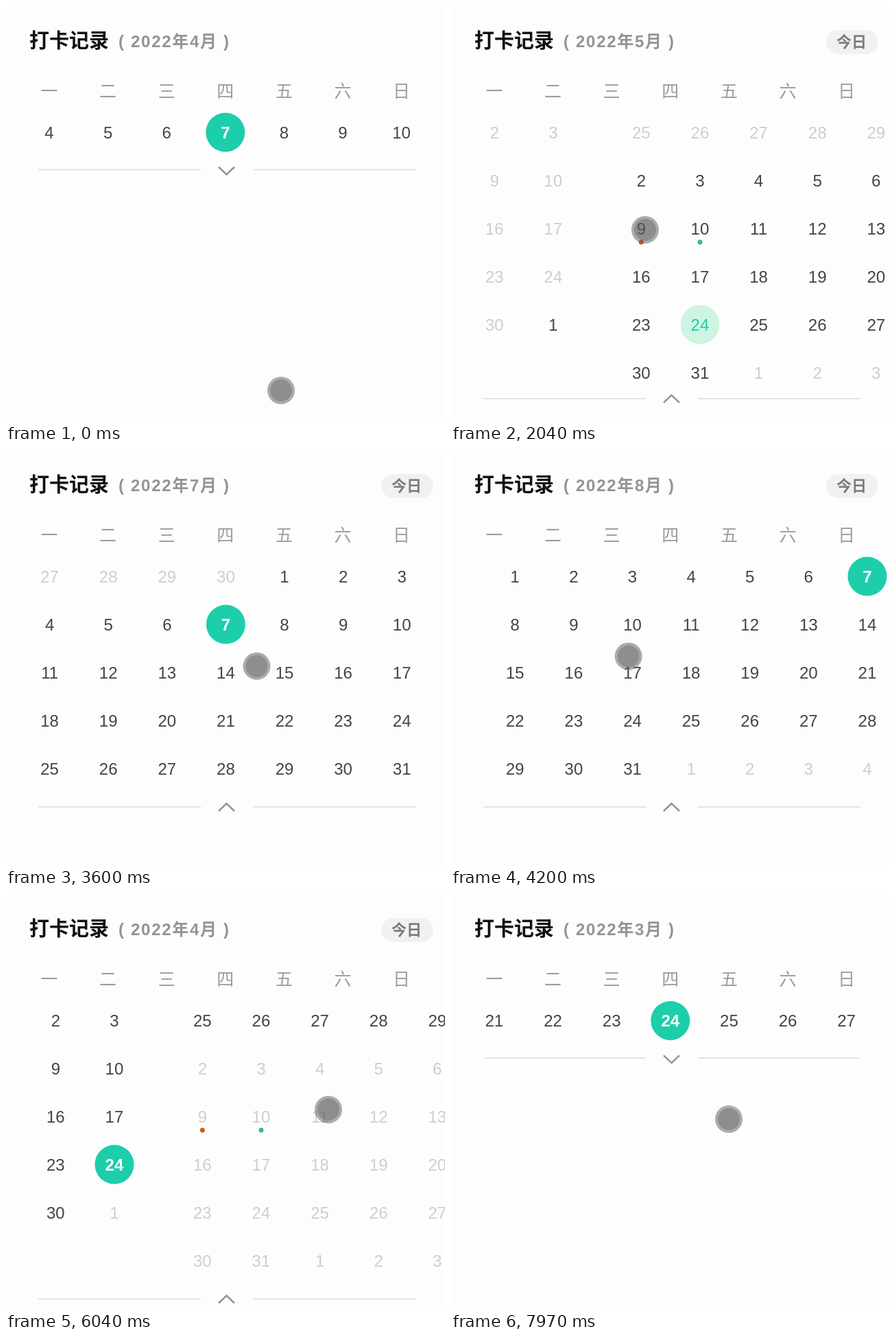
An HTML page with a canvas for the animation above (8000 ms loop, 640x606 px).

```html
<!DOCTYPE html>
<html lang="zh-CN">
<meta charset="utf-8">
<style>
  html, body { margin: 0; width: 100%; height: 100%; overflow: hidden; background: #fdfdfd; }
  canvas { display: block; }
</style>
<canvas width="640" height="606"></canvas>
<script>
const ctx = document.querySelector('canvas').getContext('2d');
const LOOP = 8000, PAGE = 642, COL = 85.6, ROW = 70, LEFT = 63, TOP = 184;
const DRAG = 160, DRAG_TIME = 150, REST = 230;
const FONT = '"Liberation Sans", "Noto Sans CJK SC", "Noto Sans CJK", sans-serif';
const TODAY = '5-24', DOTS = { '5-9': '#d9541e', '5-10': '#2cc476' };
const INK = '#444', GREY = '#949494', FADED = '#cecece', TEAL = '#1dceab';

// Where the pointer is at the end of each gesture; `turn` drags to the next or previous month
const gestures = [
  { at: -REST, x: 401, y: 560 },
  { at: 830, x: 345, y: 254, toggle: 1 },
  { at: 1880, x: 283, y: 326, turn: 1 },
  { at: 2533, x: 251, y: 326, turn: 1 },
  { at: 3125, x: 245, y: 318, turn: 1 },
  { at: 3855, x: 238, y: 314, turn: 1 },
  { at: 4887, x: 603, y: 75, today: true },
  { at: 5980, x: 470, y: 314, turn: -1 },
  { at: 6604, x: 470, y: 314, turn: -1 },
  { at: 7460, x: 342, y: 537, toggle: 1 },
  { at: 7970, x: 405, y: 328 },
];
const [openAt, closeAt] = gestures.filter(g => g.toggle).map(g => g.at + REST);

const views = [{ at: 0, month: 4, day: 7, dir: 0, drag: 0 }];
for (const { at, turn, today } of gestures) {
  const { month, day } = views.at(-1);
  if (turn) views.push({ at, month: month + turn, day, dir: turn, drag: DRAG });
  if (today) views.push({ at, month: 5, day: 24, dir: -1, drag: 0 });
}

const clamp = v => Math.min(1, Math.max(0, v));
const mix = (a, b, k) => a + (b - a) * k;
const smooth = v => (v = clamp(v), v * v * (3 - 2 * v));

// cubic-bezier(.25, .1, .25, 1)
function ease(v) {
  if (v <= 0 || v >= 1) return clamp(v);
  let lo = 0, hi = 1, s;
  for (let i = 0; i < 20; i++) {
    s = (lo + hi) / 2;
    if (.75 * s * (1 - s) + s ** 3 < v) lo = s; else hi = s;
  }
  return .3 * s * (1 - s) ** 2 + 3 * s * s * (1 - s) + s ** 3;
}

const firstCol = month => (new Date(2022, month - 1, 1).getDay() + 6) % 7;
const rowCount = month => Math.ceil((firstCol(month) + new Date(2022, month, 0).getDate()) / 7);
const fullHeight = month => 170 + ROW * rowCount(month);

function text(str, x, y, size, color, { weight = 400, align = 'center', spacing = 0 } = {}) {
  ctx.font = `${weight} ${size}px ${FONT}`;
  ctx.textAlign = align;
  ctx.letterSpacing = spacing + 'px';
  ctx.fillStyle = color;
  ctx.fillText(str, x, y);
}

function disc(x, y, r, color) {
  ctx.fillStyle = color;
  ctx.beginPath();
  ctx.arc(x, y, r, 0, 7);
  ctx.fill();
}

function drawPage(month, offset, now, shift) {
  for (let i = 0; i < rowCount(month) * 7; i++) {
    const date = new Date(2022, month - 1, 1 - firstCol(month) + i);
    const d = date.getDate(), key = date.getMonth() + 1 + '-' + d;
    const current = date.getMonth() + 1 === now.month;
    const x = LEFT + i % 7 * COL + offset, y = TOP + Math.floor(i / 7) * ROW - shift;
    let color = current ? INK : FADED, weight = 400;
    if (current && d === now.day) {
      disc(x, y, 28.5, TEAL);
      color = '#fff';
      weight = 700;
    } else if (current && key === TODAY) {
      disc(x, y, 28.5, '#cdf5e2');
      color = TEAL;
    }
    text(d, x, y + 8.5, 24, color, { weight });
    if (DOTS[key]) disc(x, y + 20, 3.5, DOTS[key]);
  }
}

function drawDivider(y, open) {
  ctx.fillStyle = '#e3e3e6';
  ctx.fillRect(47, y - 1, 237, 2);
  ctx.fillRect(360, y - 1, 237, 2);
  const side = open ? 6 : -4, tip = open ? -5 : 7;
  ctx.strokeStyle = GREY;
  ctx.lineWidth = 2.5;
  ctx.beginPath();
  ctx.moveTo(310, y + side);
  ctx.lineTo(321.5, y + tip);
  ctx.lineTo(333, y + side);
  ctx.stroke();
}

function drawPointer(t) {
  const i = gestures.findIndex(g => g.at > t);
  const to = i < 0 ? gestures.at(-1) : gestures[i], from = gestures[i < 0 ? gestures.length - 1 : i - 1];
  const turn = to.turn || 0, dragAt = to.at - Math.abs(turn) * DRAG_TIME;
  const travel = smooth((t - from.at - REST) / (dragAt - from.at - REST));
  const pull = turn * DRAG * smooth((t - dragAt) / DRAG_TIME);
  const x = mix(from.x, to.x + turn * DRAG, travel) - pull, y = mix(from.y, to.y, travel);
  disc(x, y, 20, 'rgba(90,90,90,.5)');
  disc(x, y, 16, 'rgba(90,90,90,.36)');
}

function draw(t) {
  const index = views.findLastIndex(v => v.at <= t);
  const now = views[index], next = views[index + 1], prev = views[index - 1] || now;
  const open = t >= openAt && t < closeAt;
  const spread = ease((t - openAt) / 300) - ease((t - closeAt) / 300);
  const height = mix(fullHeight(prev.month), fullHeight(now.month), ease((t - now.at - 72) / 200));
  const bottom = mix(238.5, height, spread);
  const week = Math.floor((firstCol(now.month) + now.day - 1) / 7);
  const shift = week * ROW * (1 - spread);

  ctx.fillStyle = '#fdfdfd';
  ctx.fillRect(0, 0, 640, 606);
  text('打卡记录', 34, 61, 29, '#111', { weight: 700, align: 'left' });
  text(`( 2022年${now.month}月 )`, 164, 60, 24, GREY, { weight: 700, align: 'left', spacing: 1.7 });
  [...'一二三四五六日'].forEach((day, i) => text(day, LEFT + i * COL, 133, 25, '#9c9c9c'));

  if (open && now.month + '-' + now.day !== TODAY) {
    ctx.fillStyle = '#f1f1f0';
    ctx.beginPath();
    ctx.roundRect(547, 35, 76, 35, 17.5);
    ctx.fill();
    text('今日', 584, 59.5, 22, '#7c7c7c', { weight: 700 });
  }

  ctx.save();
  ctx.beginPath();
  ctx.rect(0, 150, 640, bottom - 168);
  ctx.clip();
  let offset = now.dir * (PAGE - now.drag) * (1 - ease((t - now.at) / 500));
  let side = -now.dir;
  if (next?.drag && t > next.at - DRAG_TIME) {
    offset = -next.dir * DRAG * smooth(1 - (next.at - t) / DRAG_TIME);
    side = next.dir;
  }
  drawPage(now.month, offset, now, shift);
  if (offset) drawPage(now.month + side, offset + side * PAGE, now, shift);
  ctx.restore();

  drawDivider(bottom, open);
  drawPointer(t);
}

const start = performance.now();
(function tick() {
  draw((performance.now() - start) % LOOP);
  requestAnimationFrame(tick);
})();
</script>
</html>
```
